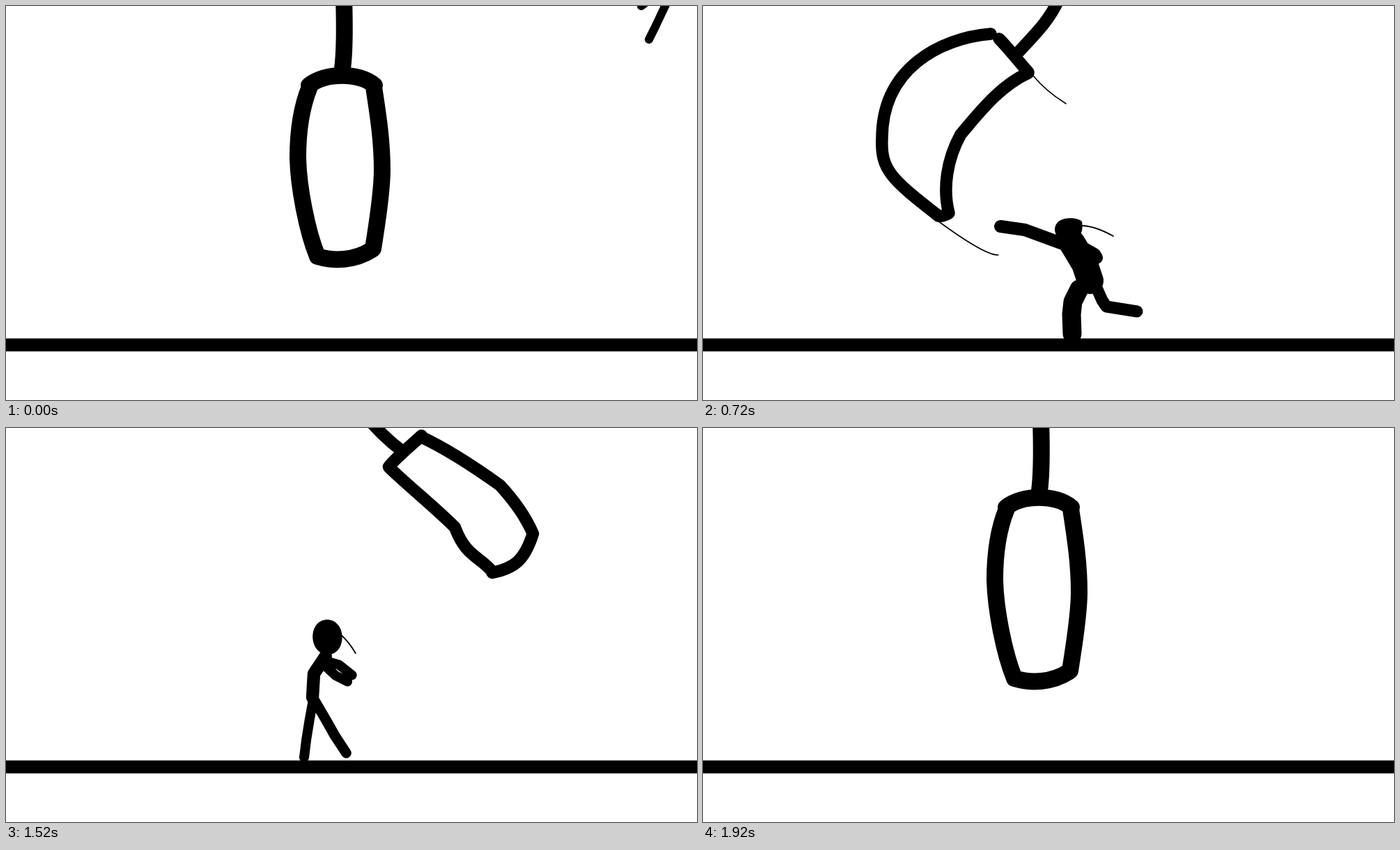
Write an HTML page without scripts that moves like this. It is 992x565 px and loops after 2480 ms.

```html
<!DOCTYPE html>
<html lang="en">
<head>
<meta charset="utf-8">
<title>Punching bag</title>
<style>
html, body { margin: 0; width: 100%; height: 100%; overflow: hidden; background: #fff; }
svg { display: block; width: 100vw; height: 100vh; }
path { fill: none; stroke: #000; stroke-linecap: round; stroke-linejoin: round; }

/* 62 drawings of 40 ms each; most poses lie two drawings apart */
path, .figure, .glint { animation: 2480ms steps(2) infinite; }
.bag { animation-name: bag; }
.trail { animation-name: trail; animation-timing-function: steps(1); stroke-width: 1.6; }
.figure { animation-name: fly; transform-origin: 345px 350px; }
.head { animation-name: head; fill: #000; stroke: none; }
.torso { animation-name: torso; }
.arms { animation-name: arms; }
.back { animation-name: back; }
.front { animation-name: front; }
.wisp { animation-name: wisp; stroke-width: 1.8; }
.glint { animation-name: glint; animation-timing-function: steps(1); fill: #fff; }

/* bag: rope, top, left side, right side, bottom */
.bag {
  --rest: path("M485 -12C486 20 487 60 483 90M435 114C458 95 508 95 529 114M436 116C424 145 419 180 419 218C420 260 432 322 447 359M528 116C533 150 540 190 540 235C540 270 532 315 527 348M447 359C470 366 500 366 526 349");
  --punched: path("M511 -10C498 18 485 32 453 66M425 47C438 60 452 78 467 95M413 40C340 46 257 90 257 190C255 235 270 248 338 301M467 96C425 115 395 155 370 184C350 220 344 262 353 297M338 301C343 302 348 300 353 297");
  --high: path("M440 -30C400 -10 380 0 355 8M345 -40C352 -20 360 10 368 35M345 -40C290 -70 200 -60 160 -35C140 -20 125 0 118 15M368 35C320 70 270 85 215 85C180 80 150 70 130 60M118 15C112 30 115 50 130 60");
  --left: path("M512 -10C503 15 492 50 473 71M432 75C460 85 490 88 511 99M434 78C405 130 385 195 372 240C362 280 354 310 348 331M511 102C493 145 491 185 481 245C470 330 447 330 434 376M347 330C365 362 395 368 432 379");
  --right: path("M462 -10C470 20 480 45 497 71M459 99C480 88 510 85 538 75M459 102C477 145 479 185 489 245C500 330 523 330 536 376M536 78C565 130 585 195 598 240C608 280 616 310 622 331M536 379C575 368 605 362 622 331");
  --far: path("M590 -30C620 -12 645 -2 672 4M670 20C675 0 681 -25 685 -45M672 20C720 40 780 48 830 48C850 48 870 47 890 44M685 -45C735 -60 800 -68 850 -68C880 -65 905 -50 921 -20M890 44C915 42 914 25 921 -20");
}
@keyframes bag {
  0%, 24.193% { d: var(--rest); stroke-width: 24; transform: translate(0, 0); animation-timing-function: steps(3); }
  29.032% { d: var(--punched); stroke-width: 17.5; transform: translate(0, 0); }
  32.258% { d: var(--high); stroke-width: 17.5; transform: translate(0, 0); animation-timing-function: steps(3); }
  37.096% { d: var(--high); stroke-width: 17.5; transform: translate(-40px, -170px); animation-timing-function: steps(1); }
  38.709% { d: var(--punched); stroke-width: 17.5; transform: translate(-40px, -330px); }
  41.935% { d: var(--left); stroke-width: 17.5; transform: translate(15px, -10px); animation-timing-function: steps(3); }
  46.774% { d: var(--right); stroke-width: 17.5; transform: translate(0, 0); animation-timing-function: steps(5); }
  54.838% { d: var(--far); stroke-width: 17.5; transform: translate(0, 0); }
  58.064% { d: var(--far); stroke-width: 17.5; transform: translate(5px, -80px); animation-timing-function: steps(1); }
  59.677% { d: var(--far); stroke-width: 17.5; transform: translate(-5px, -8px); }
  62.903% { d: var(--right); stroke-width: 17.5; transform: translate(-25px, 0); animation-timing-function: steps(1); }
  66.129% { d: var(--left); stroke-width: 18; transform: translate(0, 0); animation-timing-function: steps(3); }
  70.967% { d: var(--right); stroke-width: 18; transform: translate(-45px, 0); animation-timing-function: steps(4); }
  77.419%, 100% { d: var(--rest); stroke-width: 24; transform: translate(0, 0); }
}
@keyframes trail {
  0%, 30.645%, 67.741%, 100% { opacity: 0; }
  29.032% { opacity: 1; d: path("M474 100Q492 122 521 140M337 308Q405 358 424 357"); }
  66.129% { opacity: 1; d: path("M432 386Q432 386 433 386M432 386Q510 386 534 395"); }
}
@keyframes glint {
  0%, 40.322%, 100% { opacity: 0; }
  38.709% { opacity: 1; }
}
@keyframes fly {
  0%, 38.709% { transform: translate(0, 0) rotate(0deg); animation-timing-function: steps(3); }
  43.548% { transform: translate(4px, 8px) rotate(0deg); animation-timing-function: steps(3); }
  48.387%, 66.129% { transform: translate(0, 0) rotate(0deg); }
  69.354% { transform: translate(-170px, 6px) rotate(-16deg); animation-timing-function: steps(3); }
  74.193%, 100% { transform: translate(-500px, 15px) rotate(-40deg); }
}
@keyframes head {
  0% { d: path("M947 -125C947 -160 985 -160 985 -125C985 -88 947 -88 947 -125Z"); }
  3.225% { d: path("M862 110C862 74 900 74 900 110C900 148 862 148 862 110Z"); }
  6.451% { d: path("M671 374C671 340 709 340 709 374C709 410 671 410 671 374Z"); animation-timing-function: steps(3); }
  11.29%, 19.354% { d: path("M640 340C641 305 674 305 676 336C676 376 640 376 640 340Z"); }
  22.58% { d: path("M662 345C662 310 700 310 700 345C700 380 662 380 662 345Z"); }
  25.806% { d: path("M578 332C578 300 615 300 615 332C615 365 580 365 578 332Z"); }
  29.032% { d: path("M505 322C504 300 537 302 544 309C550 345 508 345 505 322Z"); animation-timing-function: steps(6); }
  38.709%, 45.161% { d: path("M453 356C452 336 472 337 484 332C510 365 480 400 453 356Z"); animation-timing-function: steps(6); }
  54.838% { d: path("M449 308C449 276 490 276 493 310C490 346 450 346 449 308Z"); animation-timing-function: steps(5); }
  62.903% { d: path("M438 298C438 264 480 264 480 298C480 330 440 330 438 298Z"); animation-timing-function: steps(1); }
  66.129%, 100% { d: path("M312 295C318 254 360 258 357 288C356 318 316 312 312 295Z"); }
}
@keyframes torso {
  0% { d: path("M962 -100L955 -70L950 -45"); stroke-width: 15; }
  3.225% { d: path("M878 135L868 160L858 190"); stroke-width: 16; }
  6.451% { d: path("M698 395L706 410L708 428"); stroke-width: 18; animation-timing-function: steps(3); }
  11.29%, 19.354% { d: path("M656 362L652 380L648 404"); stroke-width: 14; }
  22.58% { d: path("M680 368L676 385L668 408"); stroke-width: 16; }
  25.806% { d: path("M600 355L612 375L622 400"); stroke-width: 24; }
  29.032% { d: path("M530 340L548 370L556 394"); stroke-width: 38; animation-timing-function: steps(6); }
  38.709%, 45.161% { d: path("M482 376L500 400L516 420"); stroke-width: 22; animation-timing-function: steps(6); }
  54.838% { d: path("M470 336L458 362L456 392"); stroke-width: 20; animation-timing-function: steps(5); }
  62.903% { d: path("M456 325L438 350L436 385"); stroke-width: 18; animation-timing-function: steps(1); }
  66.129%, 100% { d: path("M329 306L308 338L310 364"); stroke-width: 21; }
}
@keyframes arms {
  0% { d: path("M960 -92L940 -75L920 -80M962 -92L980 -75L985 -60"); stroke-width: 12; }
  3.225% { d: path("M874 142L850 165L825 160M874 142L895 165L920 150"); stroke-width: 13; }
  6.451% { d: path("M698 400L672 420L650 440M700 400L728 415L735 440"); stroke-width: 14; animation-timing-function: steps(3); }
  11.29%, 19.354% { d: path("M650 368L630 391L626 407M662 370L679 390L680 433"); stroke-width: 16; }
  22.58% { d: path("M678 374L650 385L630 370M682 374L712 385L728 362"); stroke-width: 15; }
  25.806% { d: path("M545 322L570 335L602 360M612 362L635 370L650 385"); stroke-width: 16; }
  29.032% { d: path("M427 316L462 321L522 343M548 348L562 356L565 361"); stroke-width: 18; animation-timing-function: steps(6); }
  38.709%, 45.161% { d: path("M407 413L438 393L488 384M500 366L520 376L544 403"); stroke-width: 17; animation-timing-function: steps(6); }
  54.838% { d: path("M460 345L447 396L431 410M477 336L491 378L484 420"); stroke-width: 13; animation-timing-function: steps(5); }
  62.903% { d: path("M452 335L480 345L505 352M450 332L475 330L500 338"); stroke-width: 14; animation-timing-function: steps(1); }
  66.129%, 100% { d: path("M322 324L350 322L369 327M322 320L378 322L400 330"); stroke-width: 15; }
}
@keyframes back {
  0% { d: path("M948 -45L940 -25L925 -10L912 0"); stroke-width: 12; }
  3.225% { d: path("M858 190L835 205L820 230L805 250"); stroke-width: 13; }
  6.451% { d: path("M706 428L680 430L672 450L672 472"); stroke-width: 15; animation-timing-function: steps(3); }
  11.29%, 19.354% { d: path("M645 402L638 435L635 458L635 476"); stroke-width: 13; }
  22.58% { d: path("M668 405L645 425L638 450L632 474"); stroke-width: 15; }
  25.806% { d: path("M620 400L595 420L585 445L582 472"); stroke-width: 20; }
  29.032% { d: path("M540 406L531 424L529 442L530 470"); stroke-width: 27; animation-timing-function: steps(6); }
  38.709%, 45.161% { d: path("M510 420L470 441L455 455L436 474"); stroke-width: 17; animation-timing-function: steps(6); }
  54.838% { d: path("M460 402L451 430L444 452L440 474"); stroke-width: 14; animation-timing-function: steps(5); }
  62.903% { d: path("M436 388L432 415L428 445L425 472"); stroke-width: 14; animation-timing-function: steps(1); }
  66.129%, 100% { d: path("M304 370L305 409L329 428L362 437"); stroke-width: 14; }
}
@keyframes front {
  0% { d: path("M952 -45L950 -8L932 30L923 48"); stroke-width: 12; }
  3.225% { d: path("M858 190L865 220L850 245L835 265"); stroke-width: 13; }
  6.451% { d: path("M708 428L695 445L720 455L735 474"); stroke-width: 15; animation-timing-function: steps(3); }
  11.29%, 19.354% { d: path("M649 400L656 430L662 452L676 476"); stroke-width: 17; }
  22.58% { d: path("M668 405L690 430L700 450L712 474"); stroke-width: 16; }
  25.806% { d: path("M622 400L645 430L660 450L690 470"); stroke-width: 17; }
  29.032% { d: path("M561 395L573 422L579 431L623 438"); stroke-width: 17; animation-timing-function: steps(6); }
  38.709%, 45.161% { d: path("M512 424L494 448L490 468L501 472"); stroke-width: 23; animation-timing-function: steps(6); }
  54.838% { d: path("M463 400L472 425L480 445L490 470"); stroke-width: 14; animation-timing-function: steps(5); }
  62.903% { d: path("M436 385L455 415L470 440L488 465"); stroke-width: 15; animation-timing-function: steps(1); }
  66.129%, 100% { d: path("M311 370L333 395L359 415L387 438"); stroke-width: 17; }
}
@keyframes wisp {
  0% { d: path("M975 -120Q980 -130 985 -140"); }
  3.225% { d: path("M898 95Q912 85 925 70"); }
  6.451% { d: path("M708 365Q716 355 720 345"); animation-timing-function: steps(3); }
  11.29%, 19.354% { d: path("M675 338Q679 350 678 361"); }
  22.58% { d: path("M698 340Q702 352 704 364"); }
  25.806% { d: path("M613 322Q635 322 655 330"); }
  29.032% { d: path("M543 315Q562 315 589 330"); animation-timing-function: steps(6); }
  38.709%, 45.161% { d: path("M486 336Q493 348 502 362"); animation-timing-function: steps(6); }
  54.838% { d: path("M490 320Q499 340 509 367"); animation-timing-function: steps(5); }
  62.903% { d: path("M478 290Q492 300 500 312"); animation-timing-function: steps(1); }
  66.129%, 100% { d: path("M362 293Q405 324 424 325"); }
}
</style>
</head>
<body>
<svg viewBox="0 0 992 565">
  <path class="bag"/>
  <path class="trail"/>
  <g class="figure">
    <path class="back"/>
    <path class="front"/>
    <path class="torso"/>
    <path class="arms"/>
    <path class="head"/>
    <path class="wisp"/>
    <ellipse class="glint" cx="476" cy="356" rx="1.5" ry="3.5"/>
  </g>
  <rect y="476.7" width="992" height="18.6"/>
</svg>
</body>
</html>
```
